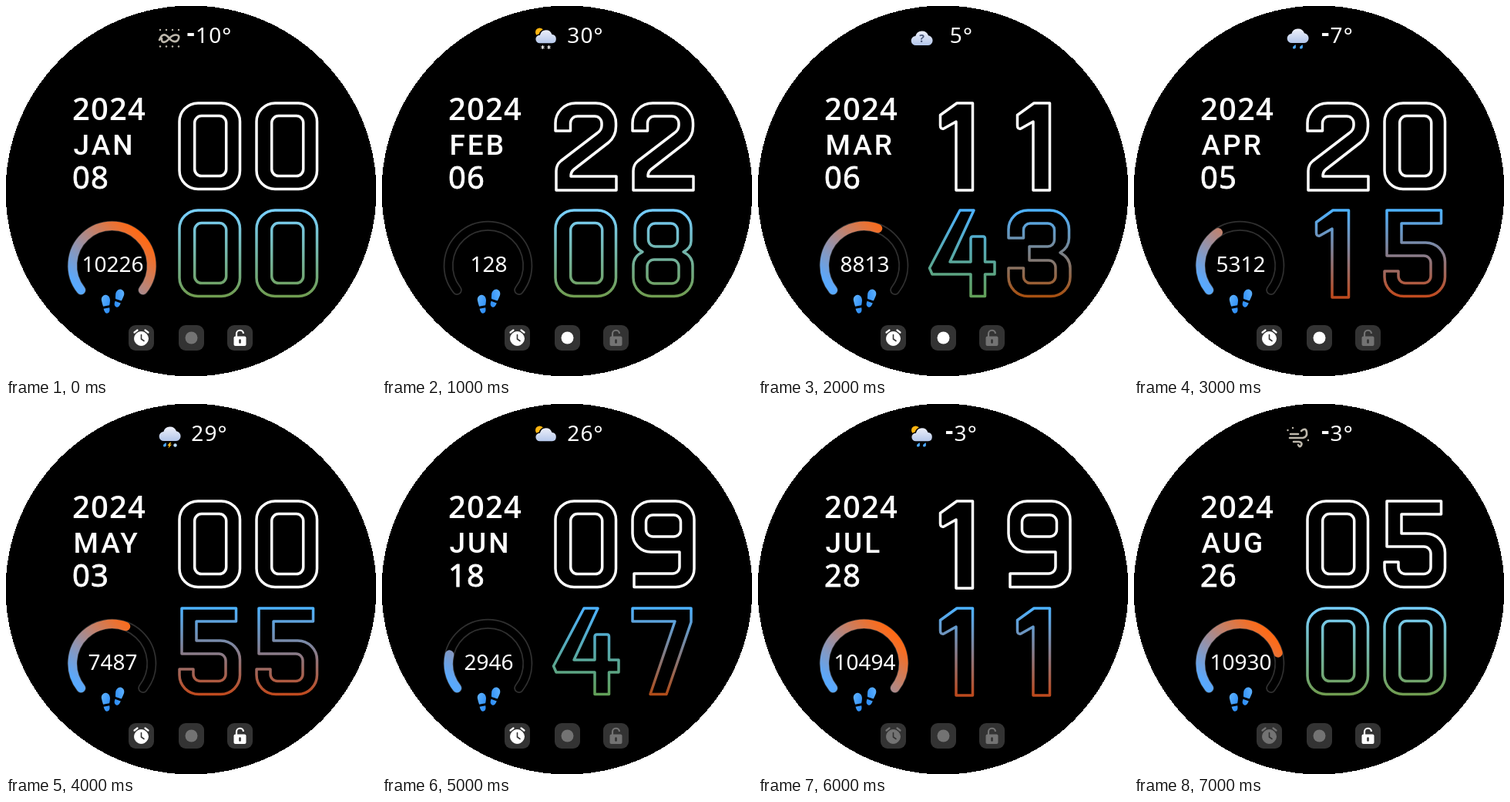
Animation of 480 by 480 pixels, one loop 8000 ms. Source, as an HTML page:

```html
<!DOCTYPE html>
<html lang="en">
<head>
<meta charset="utf-8">
<title>Watch face</title>
<style>
  html, body { margin: 0; width: 100%; height: 100%; overflow: hidden; background: #fff; }
  svg { display: block; width: 100%; height: 100%; }
  text { fill: #fff; font-family: "Noto Sans", "Open Sans", sans-serif; }
  .year { font: 600 40px "Open Sans", "Noto Sans", sans-serif; letter-spacing: 1.2px; }
  .month { font: 500 37px Roboto, sans-serif; letter-spacing: 3px; }
  .day { font-size: 40px; letter-spacing: 1px; stroke: #fff; stroke-width: .8px; }
  .steps { font-size: 28px; text-anchor: middle; }
  .temp { font-size: 28px; letter-spacing: 1.2px; text-anchor: middle; }
  .minus { font-size: 32px; font-weight: 700; }
  .digit, .arc { fill: none; stroke-linejoin: round; stroke-linecap: round; }
  .digit { stroke-width: 3.5; }
  .scene { visibility: hidden; animation: show 8s step-end infinite; }
  @keyframes show {
    0% { visibility: visible; }
    12.5%, 100% { visibility: hidden; }
  }
</style>
</head>
<body>
<svg id="face" viewBox="0 0 480 480">
  <defs>
    <linearGradient id="ring" gradientUnits="userSpaceOnUse" x1="97" y1="368" x2="171" y2="294">
      <stop stop-color="#58a9ff"/><stop offset="1" stop-color="#ff6a16"/>
    </linearGradient>
    <linearGradient id="foot" x2="1" y2="1">
      <stop stop-color="#62b4ff"/><stop offset="1" stop-color="#2386f5"/>
    </linearGradient>
    <linearGradient id="cloud" x2="0" y2="1">
      <stop stop-color="#eef0fa"/><stop offset="1" stop-color="#b3c6ea"/>
    </linearGradient>
    <path id="puff" d="M6 19.500a6 6 0 0 1-.7-12A8.800 8.800 0 0 1 22 6.800a6.400 6.400 0 0 1 0 12.700z" fill="url(#cloud)"/>
    <path id="drop" d="M1.500-3Q3 2 0 2.500T-1.500-.5z" fill="#4aa8ff"/>
    <path id="sole" d="M-1-7.500C3-8.500 6-4 5.500 0Q5 4 4.300 6L-3.800 7Q-5 3-5.500-.5C-6-4-4-7-1-7.500zM-3.400 10L4.300 9Q5.200 15.500 1.500 16.200T-3.400 10z" fill="url(#foot)"/>
    <path id="track" d="M97.300 368.500A51.300 51.300 0 1 1 177.700 368.500" pathLength="1"/>
  </defs>
  <circle cx="240" cy="240" r="240.500" shape-rendering="crispEdges"/>
  <text class="year" x="86" y="148">2024</text>
  <g class="arc">
    <use href="#track" stroke="#303030" stroke-width="13"/>
    <use href="#track" stroke="#000" stroke-width="9.500"/>
  </g>
  <use href="#sole" transform="translate(129.500 382.500) rotate(-3)"/>
  <use href="#sole" transform="matrix(-.97 -.2 -.2 .97 147.500 375)"/>
</svg>
<script>
const box = (x, y, w, h, r) => {
  const turn = (dx, dy) => `a${r} ${r} 0 0 1 ${dx * r} ${dy * r}`;
  return `M${x + r} ${y}h${w - 2 * r}${turn(1, 1)}v${h - 2 * r}${turn(-1, 1)}h${2 * r - w}${turn(-1, -1)}v${2 * r - h}${turn(1, -1)}z`;
};

// Outlines of the big numerals, drawn in an 80 by 112 cell
const glyphs = {
  0: box(0, 0, 78.5, 111.5, 24) + box(19.7, 16.6, 41, 78, 9),
  1: 'M11.500 15.500L33 0H53.500V113H32V24L16 33Q11.500 34 11.500 29z',
  2: 'M0 36V26A26 26 0 0 1 26 0H52.500A26 26 0 0 1 78.500 26V30Q78.500 43 69 51L24 86Q20 89 20 95H79V113H1V88Q1 80 7 75L54 39Q60 35 60 29V26A9 9 0 0 0 51 17H28.500A9 9 0 0 0 19.500 26V36z',
  3: 'M0 36V25A25 25 0 0 1 25 0H53.500A25 25 0 0 1 78.500 25V36Q78.500 48 67 55Q80 62 80 75V86.500A25 25 0 0 1 55 111.500H25A25 25 0 0 1 0 86.500V75H19.500V86A8.500 8.500 0 0 0 28 94.500H52A9 9 0 0 0 61 85.500V74A9 9 0 0 0 52 65H27V47H51A8.500 8.500 0 0 0 59.500 38.500V25.500A8.500 8.500 0 0 0 51 17H28A8.500 8.500 0 0 0 19.500 25.500V36z',
  4: 'M37 0H55L24 67H51V37Q51 34 54 34H67Q69.500 34 69.500 37V67H82V83H69.500V111.500H51V83H1L-2.500 75z',
  5: 'M3 0H73.500V17H22V42H53.500A25 25 0 0 1 78.500 67V86.500A25 25 0 0 1 53.500 111.500H25A25 25 0 0 1 0 86.500V79H18V85.500A9 9 0 0 0 27 94.500H51A9 9 0 0 0 60 85.500V68A9 9 0 0 0 51 59H3z',
  7: 'M0 0H76V18L44 111.500H23L55 17H0z',
  8: 'M26 0H53A23 23 0 0 1 76 23V40Q76 49 66 54Q78 60 78 72V87.500A24 24 0 0 1 54 111.500H25A24 24 0 0 1 1 87.500V72Q1 60 13 54Q3 49 3 40V23A23 23 0 0 1 26 0z' + box(20.5, 17, 38, 30, 9) + box(19, 64, 41, 31, 9),
  9: 'M24 0H56A24 24 0 0 1 80 24V87.500A24 24 0 0 1 56 111.500H2V94H52A9 9 0 0 0 61 85V66H24A24 24 0 0 1 0 42V24A24 24 0 0 1 24 0z' + box(17.5, 18, 45, 28, 9)
};

const fades = {
  0: ['#78d0ff', '#709c50'], 1: ['#4db2ff', '#bd4a1e'], 3: ['#4db2ff', '#a85010'],
  4: ['#4db2ff', '#62a058'], 5: ['#4db2ff', '#c04a1e'], 7: ['#4db2ff', '#b04c18'],
  8: ['#74ccff', '#709c50']
};

const puff = (x, y) => `<use href="#puff" x="${x}" y="${y}"/>`;
const drop = (x, y) => `<use href="#drop" x="${x}" y="${y}"/>`;
const sunny = '<circle cx="204.500" cy="34" r="5.500" fill="#ffb511"/><g stroke="#000" stroke-width="1.500">' + puff(199, 29.5) + '</g>';
const dots = list => list.map(([x, y]) => `<circle cx="${x}" cy="${y}" r="1.200"/>`).join('');
const line = d => `<path d="${d}" fill="none" stroke="#bdb7ab" stroke-width="2.600" stroke-linecap="round"/>`;
const flake = x => `<path d="M${x} 51v5m-2.200-3.800l4.400 2.600m0-2.600l-4.400 2.600" stroke="#fff"/>`;

const sky = {
  haze: '<g fill="#bdb7ab">' + dots([200, 208, 216, 224].flatMap(x => [[x, 31], [x, 52.5]])) + '</g>' +
    line('M199 44C203 34 208 37 212 42S222 48 224 42S217 36 212 42S201 49 202 42'),
  snow: sunny + flake(208.5) + flake(216.5),
  unknown: puff(199, 31.5) + '<text x="212.500" y="47" font-size="14" font-weight="700" text-anchor="middle" style="fill:#4b5878">?</text>',
  rain: puff(199, 28.5) + drop(208, 53) + drop(217, 53),
  storm: puff(199, 28.5) + drop(206, 53) + '<path d="M212.500 50l-3 4h2l-1 3.500 4.500-5h-2.500l2-2.500z" fill="#ffc01e"/><circle cx="219.500" cy="53.500" r="2.200" fill="#b9dcff"/>',
  cloudy: sunny,
  shower: sunny + drop(208, 53) + drop(216, 53),
  wind: '<g fill="#bdb7ab">' + dots([[199.5, 34], [206, 31], [226, 47]]) + '</g>' +
    line('M203 39H213M202 44H219Q225 43 224 36.500T217 35M207 49H214Q219 50 217 53.500T213 53')
};

const ink = on => on ? '#fff' : '#737373';
const pad = x => `<rect x="${x - 16.5}" y="414" width="33" height="33" rx="9" fill="#333"/>`;

const alarm = on => `${pad(175.5)}<g stroke="${ink(on)}" fill="${ink(on)}" stroke-linecap="round">
  <circle cx="175.500" cy="431.500" r="9"/>
  <path d="M166.500 423.500l4-3M184.500 423.500l-4-3" stroke-width="2.200"/>
  <path d="M175.500 426.500v5.500l3.500 2.500" fill="none" stroke="#333" stroke-width="1.600"/></g>`;

const link = on => `${pad(240.5)}<circle cx="240.500" cy="430.500" r="8" fill="${ink(on)}"/>`;

const lock = on => `${pad(303.5)}<rect x="295.500" y="428.500" width="16" height="12.500" rx="2" fill="${ink(on)}"/>
  <path d="M299 429V425.500a4.500 4.500 0 0 1 9-.5" fill="none" stroke="${ink(on)}" stroke-width="2.200"/>
  <path d="M303.500 433.500v3" stroke="#333" stroke-width="2.600" stroke-linecap="round"/>`;

const digit = (n, col, y, paint) =>
  `<path class="digit" d="${glyphs[n]}" transform="translate(${225 + col * 100} ${y})" stroke="${paint}"/>`;
const hours = s => [...s].map((n, i) => digit(n, i, 126, '#fff')).join('');
const minutes = s => [...s].map((n, i) => digit(n, i, 265, `url(#fade${n})`)).join('');

const temp = t => {
  const body = t < 0 ? `<tspan class="minus" dy="-2">-</tspan><tspan dy="2">${-t}°</tspan>` : `${t}°`;
  return `<text class="temp" x="264" y="48">${body}</text>`;
};

const arc = level => level
  ? `<use href="#track" class="arc" stroke="url(#ring)" stroke-width="11.500" stroke-dasharray="${level} 2"/>` : '';

// weather, temperature, month, day, hours, minutes, steps, ring level, [alarm, link, lock]
const scenes = [
  ['haze', -10, 'JAN', '08', '00', '00', 10226, 1, [1, 0, 1]],
  ['snow', 30, 'FEB', '06', '22', '08', 128, 0, [1, 1, 0]],
  ['unknown', 5, 'MAR', '06', '11', '43', 8813, .58, [1, 1, 0]],
  ['rain', -7, 'APR', '05', '20', '15', 5312, .37, [1, 1, 0]],
  ['storm', 29, 'MAY', '03', '00', '55', 7487, .58, [1, 0, 1]],
  ['cloudy', 26, 'JUN', '18', '09', '47', 2946, .2, [1, 0, 0]],
  ['shower', -3, 'JUL', '28', '19', '11', 10494, 1, [0, 0, 0]],
  ['wind', -3, 'AUG', '26', '05', '00', 10930, .79, [0, 0, 1]]
];

const fadeDefs = Object.entries(fades).map(([n, [a, b]]) =>
  `<linearGradient id="fade${n}" gradientUnits="userSpaceOnUse" x1="0" x2="0" y1="0" y2="112">
  <stop stop-color="${a}"/><stop offset="1" stop-color="${b}"/></linearGradient>`).join('');

const draw = ([weather, degrees, month, day, hh, mm, steps, level, [a, b, c]], i) =>
  `<g class="scene" style="animation-delay:${i - scenes.length}s">
  ${sky[weather]}${temp(degrees)}
  <text class="month" x="87.500" y="193">${month}</text>
  <text class="day" x="86" y="237">${day}</text>
  ${hours(hh)}${minutes(mm)}${arc(level)}
  <text class="steps" x="138.500" y="345">${steps}</text>
  ${alarm(a)}${link(b)}${lock(c)}</g>`;

document.getElementById('face').insertAdjacentHTML('beforeend',
  `<defs>${fadeDefs}</defs>` + scenes.map(draw).join(''));
</script>
</body>
</html>
```
